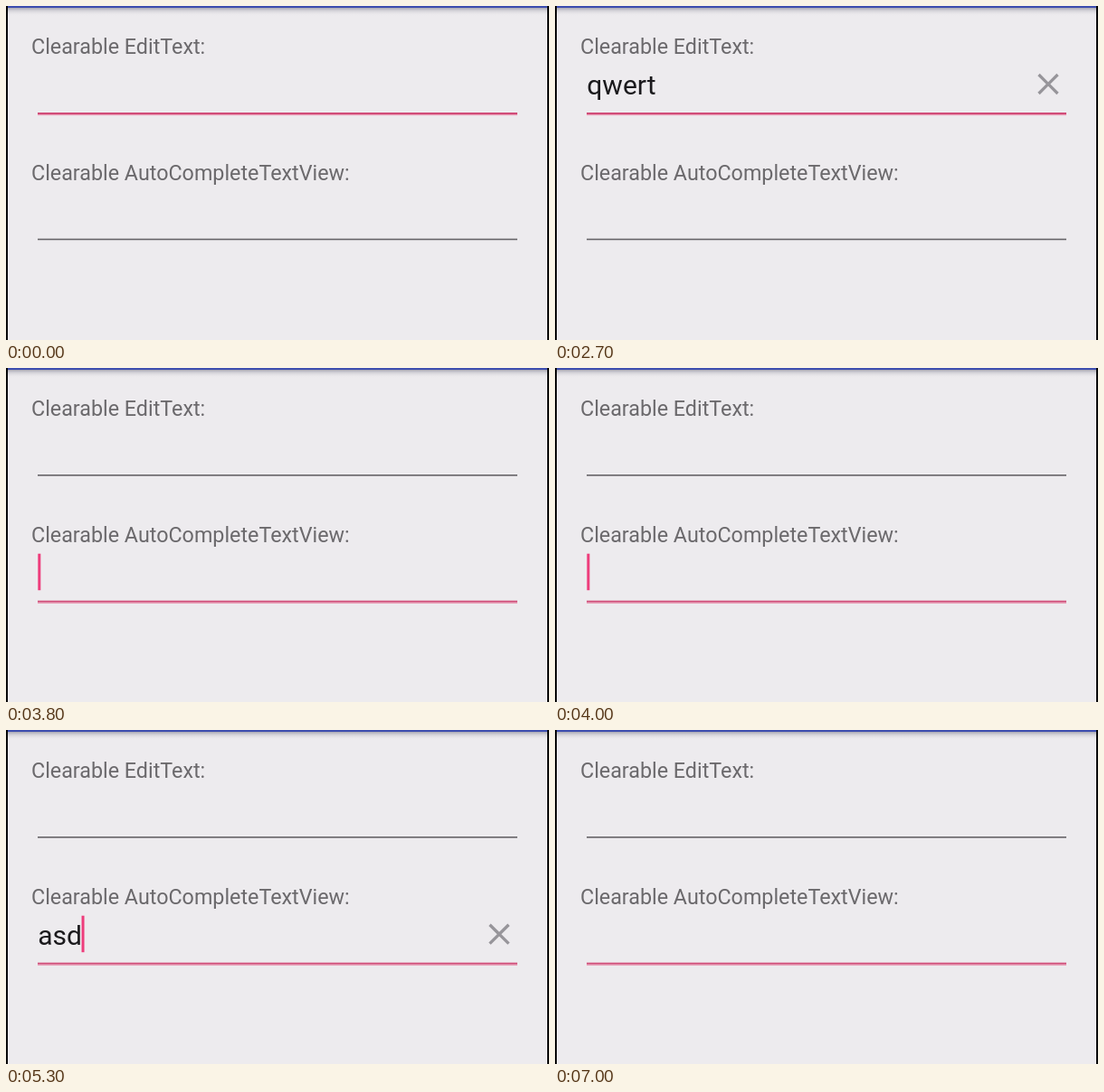
An HTML page for the animation above (7100 ms loop, 600 by 370 pixels).

```html
<!DOCTYPE html>
<html lang="en">
<head>
<meta charset="utf-8">
<title>Clearable fields</title>
<style>
  html, body { margin: 0; width: 100%; height: 100%; overflow: hidden; background: #edebee; }
  svg { display: block; width: 600px; height: 370px; }
  text { font-family: Roboto, "Noto Sans", sans-serif; white-space: pre; }
  .label { font-size: 23.3px; fill: #6b696c; }
  .value { font-size: 30px; fill: #1b1a1d; }
</style>
</head>
<body>
<svg viewBox="0 0 600 370">
  <defs>
    <linearGradient id="shade" x2="0" y2="1">
      <stop offset="0" stop-color="#8f8e9e" stop-opacity=".75"/>
      <stop offset=".35" stop-color="#b4b3bc" stop-opacity=".45"/>
      <stop offset="1" stop-color="#edebee" stop-opacity="0"/>
    </linearGradient>
    <g id="thin"><rect x="35" y="118" width="530" height="1.6" fill="#656367"/></g>
    <g id="thick">
      <rect x="35" y="118" width="530" height="2" fill="#d04c78"/>
      <rect x="35" y="120" width="530" height="1.2" fill="#e99ab4"/>
    </g>
    <path id="cross" fill="#97959a" transform="translate(525 66.5) scale(1.6667)"
      d="M19 6.41 17.59 5 12 10.59 6.41 5 5 6.41 10.59 12 5 17.59 6.41 19 12 13.41 17.59 19 19 17.59 13.41 12z"/>
  </defs>
  <rect width="600" height="370" fill="#edebee"/>
  <rect y="2" width="600" height="9" fill="url(#shade)"/>
  <rect width="600" height="2" fill="#3c4dae"/>
  <g id="fields"></g>
  <path d="M0 0h2v370h-2zM598 0h2v370h-2z" fill="#060607"/>
</svg>
<script>
const LOOP = 7100;

// keys: [time, text]; caret: visible spans; focus and tap: one span each
const fields = [
  {
    label: 'Clearable EditText:', y: 0,
    keys: [[0, ''], [800, 'q'], [1200, 'qw'], [1500, 'qwe'], [1800, 'qwer'], [2200, 'qwert'], [3000, '']],
    caret: [[100, 600], [800, 2700], [3000, 3500]],
    focus: [0, 3800], tap: [2800, 3100]
  },
  {
    label: 'Clearable AutoCompleteTextView:', y: 139.7,
    keys: [[0, ''], [4600, 'a'], [5000, 'as'], [5300, 'asd'], [5700, 'asdf'], [5900, 'asdfg'], [6500, '']],
    caret: [[3800, 4300], [4600, 6400], [6500, 7000]],
    focus: [3800, LOOP], tap: [6400, 6700]
  }
];

const within = (t, [from, to]) => t >= from && t < to;
const show = (el, on) => el.setAttribute('visibility', on ? 'visible' : 'hidden');

document.getElementById('fields').innerHTML = fields.map(f => `
  <g transform="translate(0 ${f.y})">
    <text class="label" x="28" y="53.3">${f.label}</text>
    <use href="#thin"/><use href="#thick"/>
    <text class="value" x="35.3" y="98"></text>
    <use href="#cross"/>
    <rect y="66" width="3" height="40.5" fill="#ee3d7c"/>
    <circle cx="559" cy="87" r="21" fill="#fff" fill-opacity=".35"/>
  </g>`).join('');

fields.forEach((f, i) => {
  const g = document.getElementById('fields').children[i];
  [f.thin, f.thick, f.cross] = g.querySelectorAll('use');
  f.value = g.querySelector('.value');
  f.bar = g.querySelector('rect');
  f.dot = g.querySelector('circle');
});

function draw(t) {
  for (const f of fields) {
    const text = f.keys.filter(k => k[0] <= t).pop()[1];
    const focused = within(t, f.focus);
    f.value.textContent = text;
    const width = text ? f.value.getComputedTextLength() : 0;
    f.bar.setAttribute('x', Math.max(35.3, 34.8 + width));
    show(f.bar, f.caret.some(span => within(t, span)));
    show(f.cross, text);
    show(f.thick, focused);
    show(f.thin, !focused);
    show(f.dot, within(t, f.tap));
  }
}

const start = performance.now();
function tick() {
  draw((performance.now() - start) % LOOP);
  requestAnimationFrame(tick);
}
tick();
</script>
</body>
</html>
```
